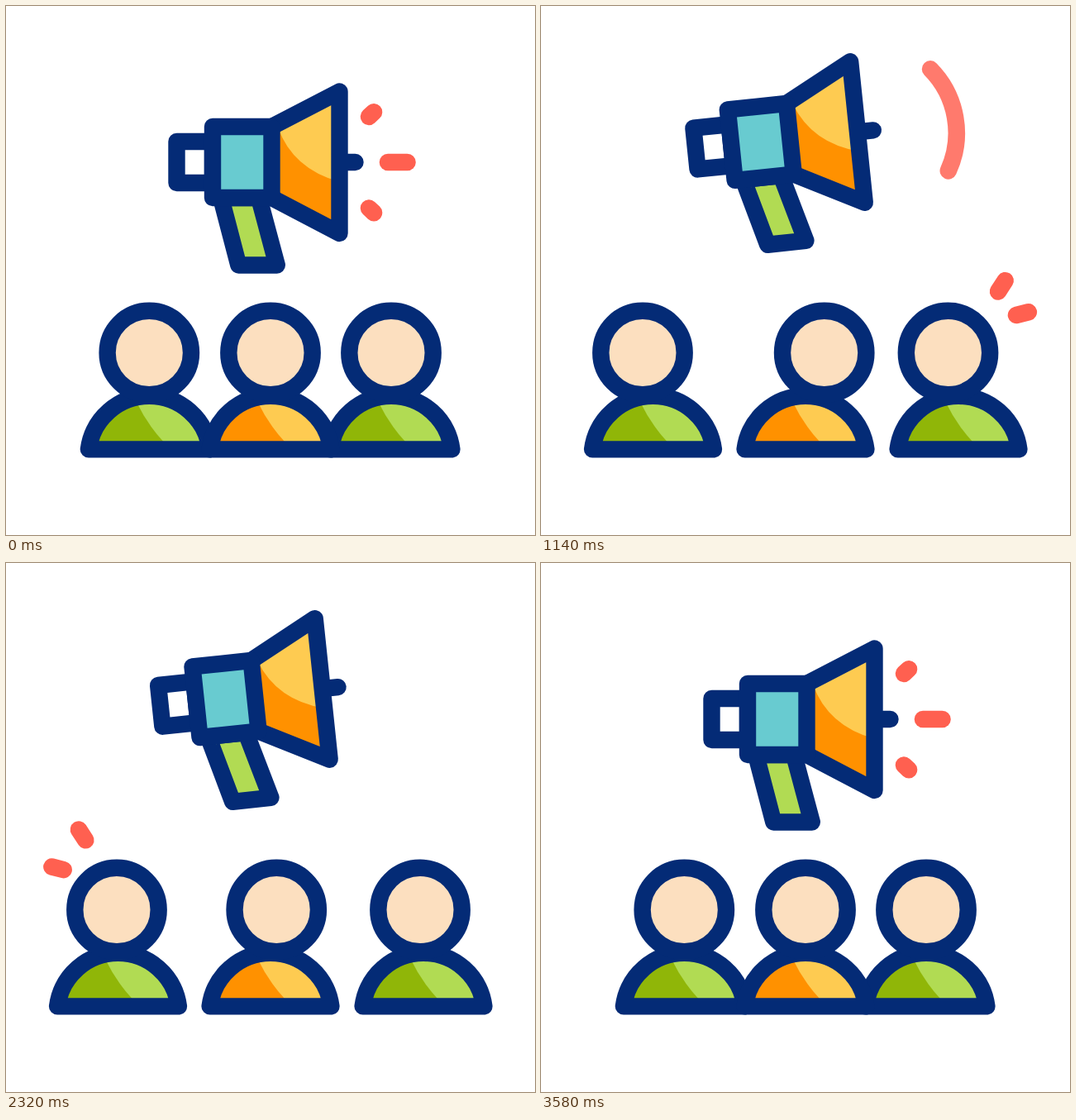
An HTML page that plays this animation: 640x640 px, repeating every 3.6 s.

```html
<!DOCTYPE html>
<html lang="en">
<head>
<meta charset="utf-8">
<title>Megaphone and audience</title>
<style>
  html, body { margin: 0; width: 100%; height: 100%; overflow: hidden; background: #fff; }
  svg { display: block; width: 100vw; height: 100vh; }
  .ink { stroke: #042b76; stroke-width: 20.4; stroke-linecap: round; stroke-linejoin: round; }
  .red { stroke: #ff6050; stroke-width: 20.6; stroke-linecap: round; fill: none; }
</style>
</head>
<body>
<svg viewBox="0 0 640 640" xmlns="http://www.w3.org/2000/svg">
  <g id="people"></g>
  <g id="horn">
    <path class="ink" fill="#fff" d="M250 164H206.5V214H250Z"/>
    <path class="ink" fill="#b1db53" d="M260 232L281.3 313.5H327.8L306 232Z"/>
    <path fill="#ff9100" d="M321.5 146L403.5 103.5V275L321.5 232Z"/>
    <path fill="#fecb51" d="M329 147Q347 197 403 212.5V104Z"/>
    <path class="ink" fill="none" d="M321.5 146L403.5 103.5V275L321.5 232M403.5 189H422.5"/>
    <path class="ink" fill="#68cbd0" d="M250 146H321.5V232H250Z"/>
    <path id="near" class="red" d="M471 152A61 61 0 0 1 474 216"/>
    <path id="far" class="red" d="M499 122.5A110 110 0 0 1 508 247"/>
  </g>
  <g id="ticks"></g>
</svg>
<script>
const LOOP = 3600;
const $ = id => document.getElementById(id);

function add(parent, tag, attrs) {
  const el = document.createElementNS('http://www.w3.org/2000/svg', tag);
  for (const k in attrs) el.setAttribute(k, attrs[k]);
  return parent.appendChild(el);
}

// Timing: eased rise, rise-and-fall with a rest between, and one without
const ramp = (t, a, b) => Math.min(1, Math.max(0, (t - a) / (b - a)));
const ease = (t, a, b) => (1 - Math.cos(Math.PI * ramp(t, a, b))) / 2;
const hold = (t, a, b, c, d) => ease(t, a, b) - ease(t, c, d);
const bump = (t, a, b, c) => hold(t, a, b, b, c);

// People
const BUST = 'M-73.4 536.4A74 74 0 0 1 73.4 536.4Z';
const SHINE = 'M-15 480Q-2.5 506 17 527L68.4 530A70 70 0 0 0 -15 476.6Z';

function person(x, dark, light) {
  const g = add($('people'), 'g', {});
  add(g, 'path', { d: BUST, fill: dark });
  add(g, 'path', { d: SHINE, fill: light });
  add(g, 'path', { d: BUST, fill: 'none', class: 'ink' });
  const head = add(g, 'circle', { cy: 419.5, r: 50.7, fill: '#fcdfbf', class: 'ink' });
  return (shift, nod) => {
    g.setAttribute('transform', `translate(${x + shift} 0)`);
    head.setAttribute('cx', nod);
  };
}
const left = person(173.3, '#90b608', '#b1db53');
const right = person(466, '#90b608', '#b1db53');
const middle = person(320, '#ff9100', '#fecb51');

// A round-capped line that can be trimmed at both ends
function trimLine(parent, x, y, dx, dy) {
  const el = add(parent, 'line', { class: 'red' });
  return (from, to) => {
    el.style.display = to > 0 && from < 1 ? '' : 'none';
    el.setAttribute('x1', x + dx * from);
    el.setAttribute('y1', y + dy * from);
    el.setAttribute('x2', x + dx * to);
    el.setAttribute('y2', y + dy * to);
  };
}

const dashes = [-1, 1].map(s => trimLine($('horn'), 439, 189.2 + 55.3 * s, 6, 5.6 * s));
dashes.push(trimLine($('horn'), 462, 189, 23.5, 0));

const tickPair = (x, side) => [
  trimLine($('ticks'), x, 374, 25.6 * side, -6.5),
  trimLine($('ticks'), x - 22 * side, 345.5, 15 * side, -23)
];
const leftTicks = tickPair(81, -1);
const rightTicks = tickPair(575, 1);

// Strength of a sound wave, sent out three times
function pulse(t, delay) {
  let v = 0;
  for (let i = 0; i < 3; i++) {
    const u = t - 700 - 860 * i - delay;
    v += ramp(u, 0, 100) - ramp(u, 125 + delay / 2, 220 + delay / 2);
  }
  return v;
}

function draw(t) {
  // Megaphone
  const lift = hold(t, 220, 800, 2990, 3450);
  const tilt = lift - bump(t, 800, 1400, 2000) - bump(t, 2000, 2570, 2990);
  $('horn').setAttribute('transform',
    `translate(${-8.4 * lift} ${-26.4 * lift}) rotate(${-15 * tilt} 298 302)`);
  $('near').setAttribute('opacity', pulse(t, 0));
  $('far').setAttribute('opacity', pulse(t, 200));
  dashes.forEach(set => set(ease(t, 220, 380) - ease(t, 3300, 3440), 1));

  // Crowd
  const outL = hold(t, 220, 700, 2980, 3440);
  const outR = hold(t, 220, 700, 2950, 3440);
  const near = hold(t, 390, 1300, 2580, 3060);
  const turn = near - 2 * bump(t, 1300, 1940, 2580);
  left(-37.8 * outL, 3.5 * near - 17 * turn);
  middle(0, 24.5 * turn);
  right(39 * outR, -13.5 * turn);

  const flick = (pair, s) => pair.forEach(
    set => set(ease(t, s + 210, s + 460), ease(t, s, s + 220)));
  flick(rightTicks, 1020);
  flick(leftTicks, 1995);
}

const start = performance.now();
function frame() {
  draw((performance.now() - start) % LOOP);
  requestAnimationFrame(frame);
}
frame();
</script>
</body>
</html>
```
